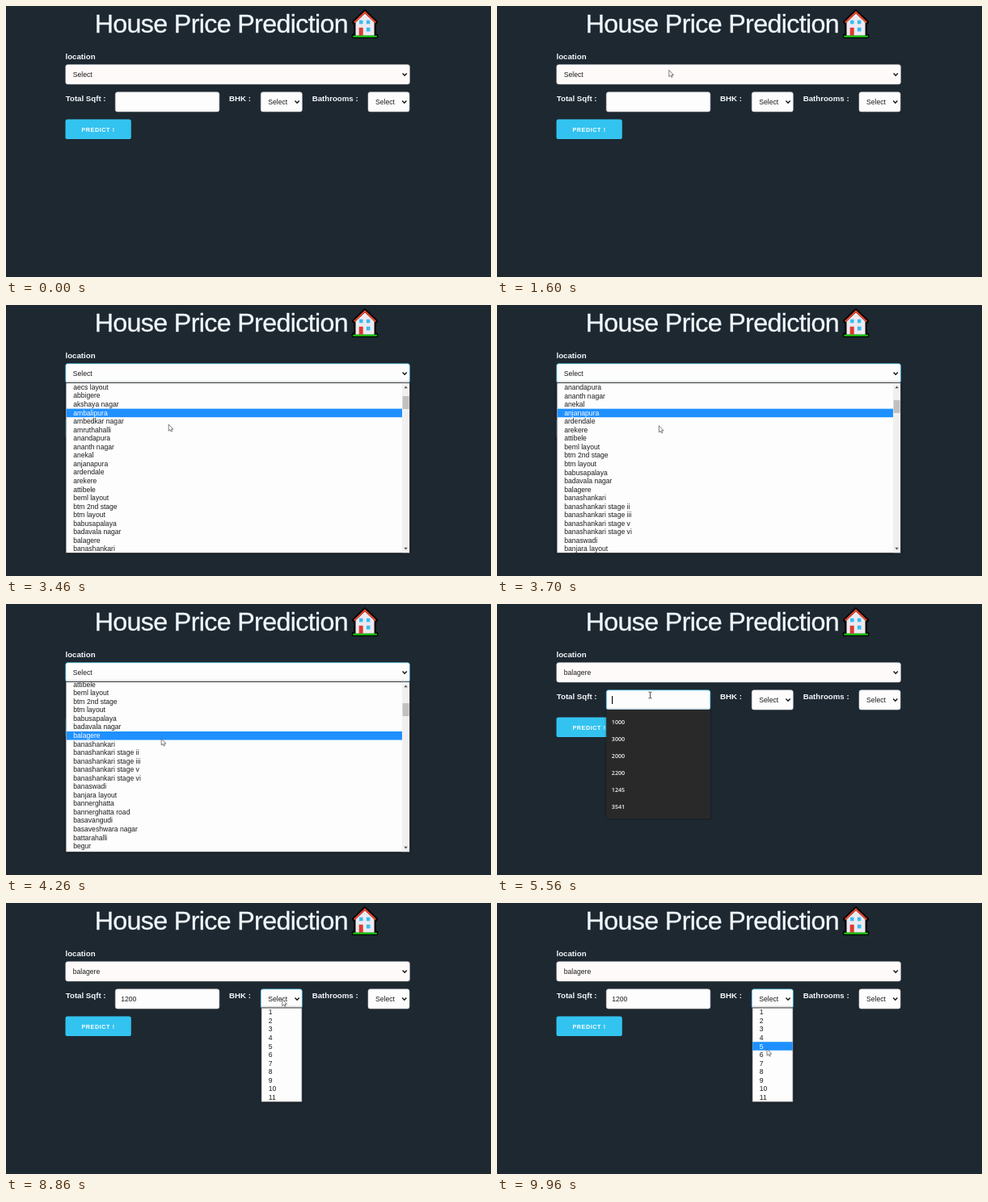
Animation of 600x336 px, one loop 10000 ms. Source, as an HTML page:

```html
<!DOCTYPE html>
<html lang="en">
<head>
<meta charset="utf-8">
<title>House Price Prediction</title>
<style>
  html, body { margin: 0; width: 100%; height: 100%; overflow: hidden; background: #1e2831; }
  svg { display: block; width: 600px; height: 336px; }
  text { font: 8.6px "Liberation Sans", Arial, sans-serif; fill: #1c1c1c; white-space: pre; }
  .title { font-size: 32.25px; letter-spacing: -.67px; fill: #f0f8ff; stroke: #f0f8ff; stroke-width: .3; }
  .label { font-size: 9.68px; font-weight: 700; fill: #f4f8fc; }
  .button { font-size: 7.1px; font-weight: 700; letter-spacing: .645px; fill: #fff; }
  .field { fill: #fdfdfd; stroke: #d1d1d1; stroke-width: .6; }
  .field.focus { stroke: #33c3f0; stroke-width: .65; }
  .snow { fill: #fffafa; }
  .snow.focus { fill: #fdfdfd; }
  .chevron { fill: none; stroke: #111; stroke-width: 1.4; }
  .popup { filter: drop-shadow(0 0 1.5px rgba(0, 0, 0, .45)); }
  .panel { fill: #fdfdfd; stroke: #33383e; stroke-width: .9; }
  .hover { fill: #1e90ff; }
  .on { fill: #fff; }
  .hints text { font: 600 7.2px "Open Sans", sans-serif; fill: #f2f2f2; }
</style>
</head>
<body>
<svg viewBox="0 0 600 336">
  <defs>
    <clipPath id="listClip"><rect x="74.5" y="96.8" width="424.6" height="210.6"/></clipPath>
  </defs>

  <text class="title" x="109.7" y="32.5">House Price Prediction</text>
  <g transform="translate(.3 -.2)">
    <path d="M443.7 5.4 L458.8 20 L456.6 23.2 V36 H458.8 V39.2 H428.7 V36 H431 V23.2 L428.7 20 Z"
          fill="#000" stroke="#000" stroke-width="2.2" stroke-linejoin="round"/>
    <path d="M443.7 9.5 L455.3 20.5 V37 H432.2 V20.5 Z" fill="#ece9f1"/>
    <path d="M430.4 20.6 L443.7 7.9 L457 20.6" fill="none" stroke="#e8472b" stroke-width="2.1"/>
    <path d="M436.8 18h4.4v4.4h-4.4zM445.6 18h4.4v4.4h-4.4zM445.6 27h4.6v4.6h-4.6z" fill="#36bdf0"/>
    <path d="M436.4 27h5v10h-5z" fill="#dc3a2f"/>
    <path d="M429 36.8h29.6v2.2h-29.6z" fill="#16c60c"/>
  </g>

  <text class="label" x="73.5" y="65.6">location</text>
  <text class="label" x="73.8" y="117.5">Total Sqft :</text>
  <text class="label" x="276" y="117.5">BHK :</text>
  <text class="label" x="378.7" y="117.5">Bathrooms :</text>

  <rect id="placeBox" class="field snow" x="73.8" y="72.7" width="425.6" height="24.2" rx="2.6"/>
  <text id="placeText" x="82.8" y="87.9">Select</text>
  <path class="chevron" d="M490.6 83.6l2.6 2.6 2.6-2.6"/>

  <rect id="sqftBox" class="field" x="135.3" y="106.8" width="128.5" height="24.2" rx="2.6"/>
  <text id="sqftText" x="142.2" y="121.8"></text>
  <rect id="caret" y="114" width="1" height="10" fill="#111"/>

  <rect id="bhkBox" class="field" x="315.3" y="106.8" width="51" height="24.2" rx="2.6"/>
  <text x="324.3" y="121.9">Select</text>
  <path class="chevron" d="M357.5 117.6l2.6 2.6 2.6-2.6"/>

  <rect class="field" x="448" y="106.8" width="51" height="24.2" rx="2.6"/>
  <text x="457" y="121.9">Select</text>
  <path class="chevron" d="M490.2 117.6l2.6 2.6 2.6-2.6"/>

  <rect x="73.5" y="140.5" width="81.3" height="24.5" rx="2.6" fill="#33c3f0"/>
  <text class="button" x="93.4" y="155.7">PREDICT !</text>

  <g id="hints" class="hints popup">
    <rect id="hintPanel" x="135.2" y="131" width="128.8" fill="#29292a" rx="1"/>
  </g>

  <g id="placePopup" class="popup">
    <rect class="panel" x="74" y="96.5" width="425.4" height="211.1"/>
    <g clip-path="url(#listClip)">
      <rect id="placeHover" class="hover" x="74.5" width="415.5" height="10.55"/>
      <g id="placeRows"></g>
    </g>
    <rect x="490" y="96.9" width="9" height="210.3" fill="#f0f0f0"/>
    <rect id="thumb" x="490.6" width="8" height="16" fill="#c1c1c1"/>
    <path d="M492.4 103.2l2.2-2.6 2.2 2.6zM492.4 300.8l2.2 2.6 2.2-2.6z" fill="#505050"/>
  </g>

  <g id="bhkPopup" class="popup">
    <rect class="panel" x="315.8" y="130" width="50.4" height="116.8"/>
    <rect id="bhkHover" class="hover" x="316.2" width="49.6" height="10.55"/>
    <g id="bhkRows"></g>
  </g>

  <path id="arrow" d="M0 0V8.2L1.9 6.5L3.1 9.1L4.4 8.5L3.2 6.1H5.7Z"
        fill="#fff" stroke="#4a4a4a" stroke-width=".7" stroke-linejoin="round"/>
  <path id="beam" d="M-2 -3.8H-.5L0 -3.3L.5 -3.8H2M0 -3.3V3.3M-2 3.8H-.5L0 3.3L.5 3.8H2"
        fill="none" stroke="#222" stroke-width=".8"/>
</svg>
<script>
const LOOP = 10000, ROW = 10.55, LIST_TOP = 97.2, BHK_TOP = 130;
const $ = id => document.getElementById(id);

const places = `1st block jayanagar,1st phase jp nagar,2nd phase judicial layout,2nd stage nagarbhavi,
5th block hbr layout,5th phase jp nagar,6th phase jp nagar,7th phase jp nagar,8th phase jp nagar,
9th phase jp nagar,aecs layout,abbigere,akshaya nagar,ambalipura,ambedkar nagar,amruthahalli,
anandapura,ananth nagar,anekal,anjanapura,ardendale,arekere,attibele,beml layout,btm 2nd stage,
btm layout,babusapalaya,badavala nagar,balagere,banashankari,banashankari stage ii,
banashankari stage iii,banashankari stage v,banashankari stage vi,banaswadi,banjara layout,
bannerghatta,bannerghatta road,basavangudi,basaveshwara nagar,battarahalli,begur,begur road`
  .split(',').map(s => s.trim());
const hintValues = ['1000', '3000', '2000', '2200', '1245', '3541'];

// Moments of the session, in ms
const OPEN_PLACE = 2250, PICK_PLACE = 4560, FOCUS_SQFT = 5260, OPEN_BHK = 8600;
const keyTimes = [6450, 6700, 6950, 7200];

const pointer = [
  [200, 52, 196], [1000, 190, 165], [1500, 212.8, 79.4], [2300, 212.8, 79.4],
  [2900, 201.2, 148], [3600, 201.2, 148], [4150, 192.2, 167], [4650, 192.2, 167],
  [5180, 189.5, 113], [7780, 189.5, 113], [8130, 300, 155], [8450, 342, 118],
  [8800, 342, 118], [9300, 337, 150], [9900, 334, 181]
];
const scrollKeys = [[3010, 0], [3400, 92], [3460, 105.5], [3950, 234.6]];

function sample(keys, t, ease = u => u) {
  if (t <= keys[0][0]) return keys[0].slice(1);
  for (let i = 1; i < keys.length; i++) {
    const a = keys[i - 1], b = keys[i];
    if (t < b[0]) {
      const u = ease((t - a[0]) / (b[0] - a[0]));
      return a.slice(1).map((v, k) => v + (b[k + 1] - v) * u);
    }
  }
  return keys[keys.length - 1].slice(1);
}
const smooth = u => u * u * (3 - 2 * u);
const pointerAt = t => sample(pointer, t, smooth);
const scrollAt = t => sample(scrollKeys, t)[0];

function addText(parent, str, x, y) {
  const el = document.createElementNS('http://www.w3.org/2000/svg', 'text');
  el.textContent = str;
  el.setAttribute('x', x);
  el.setAttribute('y', y);
  return parent.appendChild(el);
}
const set = (id, name, value) => $(id).setAttribute(name, value);
const show = (id, on) => set(id, 'visibility', on ? 'visible' : 'hidden');

const placeRows = places.map((p, i) => addText($('placeRows'), p, 83.2, LIST_TOP + 8 + i * ROW));
const bhkRows = Array.from({ length: 11 }, (_, i) =>
  addText($('bhkRows'), i + 1, 324.8, BHK_TOP + 8.3 + i * ROW));
const hintRows = hintValues.map(v => addText($('hints'), v, 141.8, 0));

function mark(rows, index) {
  rows.forEach((row, i) => row.setAttribute('class', i === index ? 'on' : ''));
}

function drawPlaces(t) {
  const open = t >= OPEN_PLACE && t < PICK_PLACE;
  show('placePopup', open);
  $('placeBox').classList.toggle('focus', t >= OPEN_PLACE && t < FOCUS_SQFT);
  $('placeText').textContent = t < PICK_PLACE ? 'Select' : 'balagere';
  if (!open) return;
  const scroll = scrollAt(t), seen = t - 60;   // hover trails the scroll
  const hit = Math.floor((pointerAt(seen)[1] - LIST_TOP + scrollAt(seen)) / ROW);
  set('placeRows', 'transform', `translate(0 ${-scroll})`);
  set('placeHover', 'y', hit < 0 ? -50 : LIST_TOP + hit * ROW - scroll);
  set('thumb', 'y', 104.8 + scroll * .0775);
  mark(placeRows, hit);
}

function drawSqft(t) {
  const focus = t >= FOCUS_SQFT && t < OPEN_BHK;
  const count = keyTimes.filter(k => t >= k).length;
  const typed = '1200'.slice(0, count);
  const since = t - (count ? keyTimes[count - 1] : FOCUS_SQFT);
  $('sqftText').textContent = typed;
  $('sqftBox').classList.toggle('focus', focus);
  show('caret', focus && since % 1060 < 530);
  set('caret', 'x', 142 + count * 4.78);
  set('caret', 'width', count ? .7 : 1.2);

  let n = 0;
  hintRows.forEach((row, i) => {
    const fits = focus && hintValues[i].startsWith(typed);
    row.setAttribute('visibility', fits ? 'visible' : 'hidden');
    if (fits) row.setAttribute('y', 148.6 + 21 * n++);
  });
  show('hintPanel', n > 0);
  set('hintPanel', 'height', 9 + 21 * n);
}

function drawBhk(t) {
  const open = t >= OPEN_BHK;
  const hit = Math.floor((pointerAt(t)[1] - BHK_TOP) / ROW);
  show('bhkPopup', open);
  show('bhkHover', open && hit >= 0);
  $('bhkBox').classList.toggle('focus', open);
  set('bhkHover', 'y', BHK_TOP + hit * ROW);
  mark(bhkRows, hit);
}

function drawPointer(t) {
  const [x, y] = pointerAt(t);
  const inInput = t > PICK_PLACE && x > 135 && x < 264 && y > 106 && y < 131;
  show('arrow', t >= pointer[0][0] && !inInput);
  show('beam', inInput);
  set(inInput ? 'beam' : 'arrow', 'transform', `translate(${x} ${y})`);
}

function frame() {
  const t = performance.now() % LOOP;
  drawPlaces(t);
  drawSqft(t);
  drawBhk(t);
  drawPointer(t);
  requestAnimationFrame(frame);
}
frame();
</script>
</body>
</html>
```
